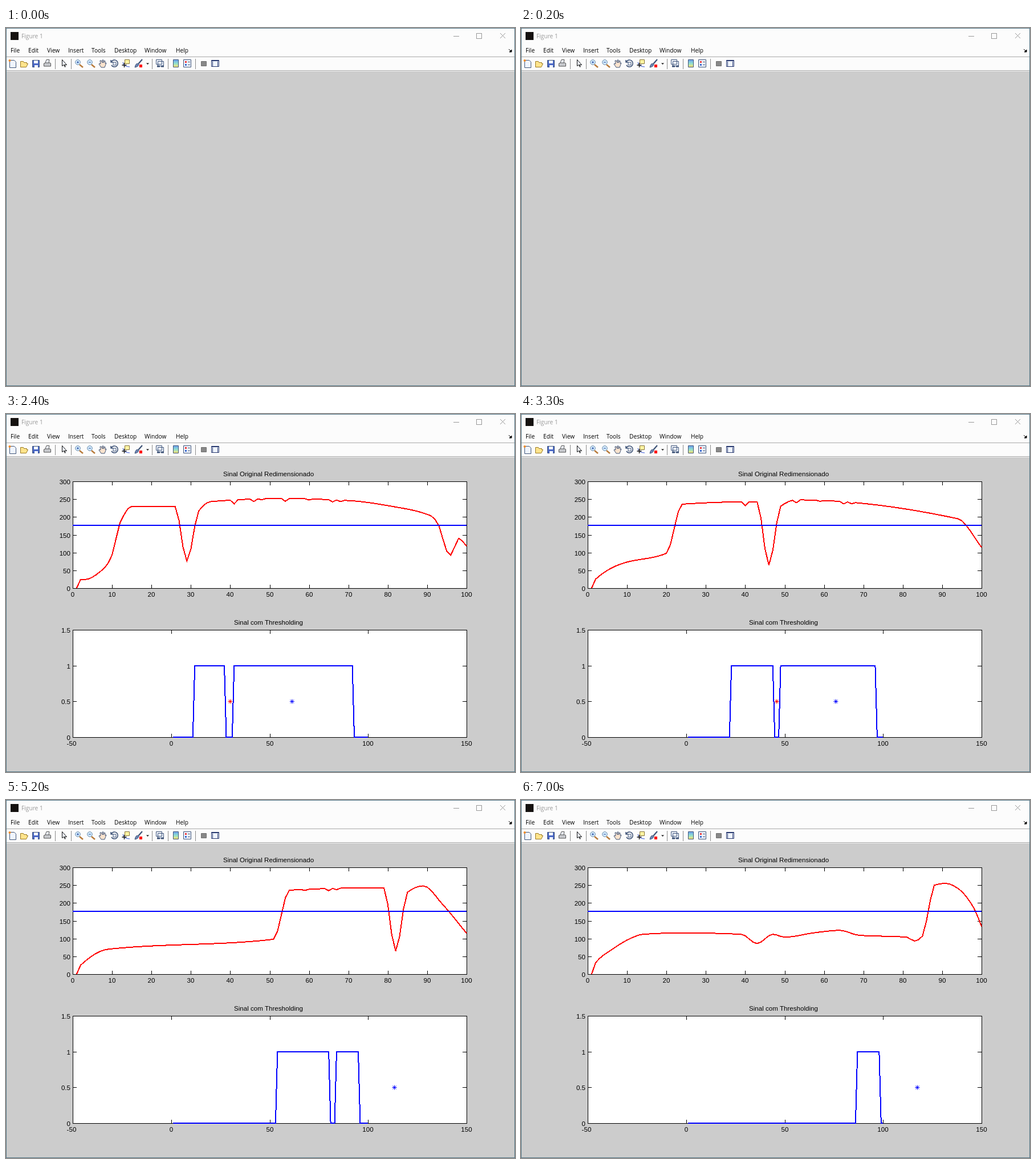
Recreate the animation shown at these times as an HTML page. Size 893 by 627 pixels, loop 8000 ms.

```html
<!DOCTYPE html>
<html lang="en">
<head>
<meta charset="utf-8">
<title>Figure 1</title>
<style>
  html, body { margin: 0; width: 100%; height: 100%; overflow: hidden; background: #ccc; }
  svg { display: block; }
  .ui { font: 10.2px "Open Sans", "Noto Sans", sans-serif; }
  .plot { font: 11.6px "Liberation Sans", Arial, sans-serif; }
  .crisp { shape-rendering: crispEdges; }
  .trace { fill: none; stroke-width: 2; }
</style>
</head>
<body>
<svg width="893" height="627">
  <rect width="893" height="627" fill="#ccc"/>
  <g class="crisp">
    <rect width="893" height="75" fill="#fcfcfc"/>
    <path d="M0 50.5H893M0 74.5H893" stroke="#a8a8a8"/>
    <path d="M0 75.5H893" stroke="#f4f4f4"/>
    <path id="separators" stroke="#8c8c8c"/>
    <rect x="8" y="7" width="14" height="14" fill="#15110f"/>
  </g>
  <g fill="none" stroke="#999">
    <path d="M785 14.5h10M867 9l9 9m0-9l-9 9"/>
    <rect x="825.5" y="9.5" width="9" height="9"/>
  </g>
  <path d="M882 37l4 4m1-3v4h-4z" stroke="#000"/>
  <g class="ui" id="menu"><text x="27" y="18" fill="#999">Figure 1</text></g>

  <!-- toolbar -->
  <g stroke="#3f5478" stroke-linejoin="round" fill="#f0f5ff">
    <path d="M6.5 56.5h8l3 3v10h-11z"/>
    <circle cx="6.5" cy="57" r="2" fill="#f08a24" stroke="none"/>
    <path d="M25.5 68.500v-10h5l1 2h5v2h2l-3 6z" fill="#ffe48c" stroke="#9b7a23"/>
    <path d="M46.500 56.500h12v12h-12z" fill="#4a67c4"/>
    <path d="M49 57h7v5h-7zM50 65h6v4h-6z" stroke="none"/>
    <path d="M69 61l2-5.500h5l-1 5.500" stroke="#555"/>
    <path d="M66.500 62l3-1h8l1 1v5h-12z" fill="#c7c9cd" stroke="#555"/>
    <path d="M98.500 55.500v11l3-2 2 4 1-1-2-3h4z" stroke="#111"/>
    <g id="lens">
      <path d="M129 64l6 5" stroke="#b77a3a" stroke-width="2.5"/>
      <circle cx="126" cy="60" r="4.3" fill="#d8f0ff" stroke="#6585a8"/>
      <path d="M124 60h4" stroke="#1c3f9c"/>
    </g>
    <use href="#lens" x="21"/>
    <path d="M126 58v4" stroke="#1c3f9c"/>
    <path d="M167 69l-4-6 1-1 2 1-1-6h2l2 4v-5h2v5l2-4 1 1v4l2-1-3 8z" fill="#fbe3cd"/>
    <path d="M185 59a6 6 0 1 1 0 6m-1-9v4h4" fill="none" stroke-width="1.6"/>
    <rect x="188" y="60" width="5" height="5"/>
    <rect x="208.5" y="55.5" width="8" height="7" fill="#fff4a3" stroke="#86753a"/>
    <path d="M205 60q1 8 12 8" fill="none" stroke="#3555d5"/>
    <path d="M207.5 61v8m-4-4h8" stroke="#111" stroke-width="1.4"/>
    <path d="M239 55l-7 8" stroke-width="2.2"/>
    <path d="M226 69q1-6 4-7l3 2q-1 4-7 5" fill="#6d86b5"/>
    <rect x="234" y="64" width="5" height="5" fill="#f00" stroke="none"/>
    <path d="M246 61.5h5l-2.500 2.500z" fill="#111" stroke="none"/>
    <path d="M263.5 55.5h10v8h-10zm3 3h10v8h-10z"/>
    <path d="M265 67h12" stroke-width="3" stroke-dasharray="5 2"/>
    <rect x="293.5" y="55.5" width="9" height="13" fill="url(#bar)"/>
    <rect x="311.5" y="55.5" width="13" height="13"/>
    <path d="M314 58h3v3h-3z" fill="#e33" stroke="none"/>
    <path d="M314 63h3v3h-3z" fill="#36c" stroke="none"/>
    <path d="M319 59.5h4m-4 5h4"/>
    <rect x="342.5" y="58.5" width="9" height="8" fill="#888" stroke="#707070"/>
    <path d="M360.5 56.5h13v11h-13zm0 1h13m-11 1v9m9-9v9" stroke="#28396f"/>
  </g>
  <linearGradient id="bar" x2="0" y2="1">
    <stop stop-color="#6b9cf0"/><stop offset=".5" stop-color="#8fe0d0"/><stop offset="1" stop-color="#ffe36b"/>
  </linearGradient>
  <rect class="crisp" x=".5" y=".5" width="892" height="626" fill="none" stroke="#567888"/>

  <g id="plots" class="plot" visibility="hidden">
    <g id="axes"></g>
    <g class="crisp trace">
      <polyline id="signal" stroke="#f00"/>
      <path d="M117 195h691" stroke="#00f"/>
      <polyline id="binary" stroke="#00f"/>
    </g>
    <path id="dipMark" d="M-4 0h8M0-4v8M-3-3l6 6m0-6l-6 6" stroke="#f00"/>
    <path id="laneMark" d="M-4 0h8M0-4v8M-3-3l6 6m0-6l-6 6" stroke="#00f"/>
  </g>
</svg>
<script>
const $ = id => document.getElementById(id);
const LOOP = 8000, THRESHOLD = 176.5;
const LEFT = 117, WIDTH = 691;

const signalX = x => LEFT + x * WIDTH / 100;
const signalY = y => 305 - y * 187 / 300;
const binaryX = x => LEFT + (x + 50) * WIDTH / 200;
const binaryY = y => 566 - y * 188 / 1.5;
const range = (from, to, step) =>
  Array.from({ length: (to - from) / step + 1 }, (_, i) => from + i * step);

// Monotone cubic through flat x, y knots.
function curve(knots, x) {
  const px = i => knots[2 * i], py = i => knots[2 * i + 1], last = knots.length / 2 - 1;
  const secant = i => (py(i + 1) - py(i)) / (px(i + 1) - px(i));
  const slope = i => {
    if (i === 0) return secant(0);
    if (i === last) return secant(i - 1);
    const a = secant(i - 1), b = secant(i);
    return a * b > 0 ? 2 * a * b / (a + b) : 0;
  };
  let i = 0;
  while (px(i + 1) < x) i++;
  const h = px(i + 1) - px(i), t = (x - px(i)) / h, u = 1 - t;
  return u * u * ((1 + 2 * t) * py(i) + t * h * slope(i)) +
    t * t * ((1 + 2 * u) * py(i + 1) - u * h * slope(i + 1));
}

// Small notches that recur in every bright stretch.
const notches = { 40: 11, 45: 7, 47: 3, 53: 8, 59: 3, 65: 6, 67: 4 };
const ripple = (x, y) => y > 225 ? notches[x] || 0 : 0;

const scans = [];
function addScan(at, dip, lane, shift, knots) {
  const values = range(1, 100, 1).map(x => {
    const y = curve(knots, x);
    return y - ripple(x - shift, y);
  });
  scans.push({ at, dip, lane, values });
}

// Dark ground, a bright stretch from start, and one narrow dip.
const roadKnots = (start, dip) => [
  1, 0, 2, 25, 9, 70, start - 2, 98, start + 2, 236, dip - 3, 243, dip, 65, dip + 3, 230,
  dip + 7, 248, Math.max(dip + 10, 94), 195, Math.max(dip + 14, 100), 115];

addScan(1400, 17.8, 52.4, 0, [
  1, 0, 3, 44, 6, 148, 11, 215, 14, 231, 16, 214, 18, 110, 20, 180, 22, 236, 36, 248,
  60, 255, 70, 248, 78, 232, 83, 214, 86, 88, 89, 204, 94, 181, 98, 54, 100, 37]);
addScan(2400, 30, 61.4, 1, [
  1, 0, 2, 24, 3, 24, 8, 56, 10, 93, 12, 183, 15, 230, 26, 230, 29, 76, 32, 217, 35, 243,
  53, 252, 70, 246, 82, 228, 91, 203, 93, 175, 95, 103, 96, 93, 98, 140, 100, 118]);
addScan(3300, 46, 76, 0, roadKnots(22, 46));
addScan(4200, undefined, 95.4, 0, [
  1, 0, 2, 25, 9, 70, 16, 90, 24, 94, 33, 99, 35, 187, 36, 230, 38, 243, 53, 252, 61, 237,
  62, 175, 64, 59, 67, 229, 69, 239, 73, 241, 80, 226, 92, 205, 94, 192, 95, 174, 100, 115]);
addScan(5200, undefined, 113.4, 0, roadKnots(53, 82));
addScan(6100, undefined, 102.4, 0, roadKnots(71, 97));
addScan(7000, undefined, 117.4, 0, [
  1, 0, 2, 32, 6, 68, 11, 101, 14, 112, 24, 116, 39, 112, 43, 86, 47, 112, 50, 104, 58, 117,
  64, 123, 69, 109, 81, 104, 83, 93, 85, 107, 87, 208, 88, 250, 91, 255, 94, 241, 98, 187, 100, 134]);

const label = (x, y, text, anchor = "middle") =>
  `<text x="${x}" y="${y}" text-anchor="${anchor}">${text}</text>`;

function axes(title, top, bottom, xs, ys, toX, toY) {
  const right = LEFT + WIDTH;
  let ticks = "", labels = label(460.5, top - 9, title);
  for (const x of xs) {
    const px = Math.round(toX(x)) + .5;
    ticks += `M${px} ${top}v7M${px} ${bottom}v-6`;
    labels += label(x < 0 ? 115 : px - .5, bottom + 15, x);
  }
  for (const y of ys) {
    const py = Math.round(toY(y)) + .5;
    ticks += `M${LEFT} ${py}h7M${right} ${py}h-7`;
    labels += label(113, py + 4, y, "end");
  }
  return `<g class="crisp" stroke="#000"><rect x="${LEFT + .5}" y="${top + .5}" width="${WIDTH}"
    height="${bottom - top}" fill="#fff"/><path d="${ticks}"/></g>${labels}`;
}

$("axes").innerHTML =
  axes("Sinal Original Redimensionado", 118, 305, range(0, 100, 10), range(0, 300, 50), signalX, signalY) +
  axes("Sinal com Thresholding", 378, 566, range(-50, 150, 50), range(0, 1.5, .5), binaryX, binaryY);

$("separators").setAttribute("d", [86, 114, 256, 284, 332].map(x => `M${x}.5 54v18`).join(""));

const menu = { File: 8, Edit: 39, View: 72, Insert: 109, Tools: 150, Desktop: 190, Window: 243, Help: 298 };
for (const [name, x] of Object.entries(menu)) $("menu").innerHTML += label(x, 43, name, "start");

const polyline = (id, values, toX, toY) =>
  $(id).setAttribute("points", values.map((y, i) => `${toX(i + 1)},${toY(y)}`).join(" "));

function mark(id, x) {
  $(id).style.display = x === undefined ? "none" : "";
  if (x !== undefined) $(id).setAttribute("transform", `translate(${binaryX(x)} 503.5)`);
}

let shown;
function draw(now) {
  const time = now % LOOP;
  const scan = scans.findLast(s => s.at <= time);
  if (scan !== shown) {
    shown = scan;
    $("plots").setAttribute("visibility", scan ? "visible" : "hidden");
    if (scan) {
      polyline("signal", scan.values, signalX, signalY);
      polyline("binary", scan.values.map(y => y > THRESHOLD ? 1 : 0), binaryX, binaryY);
      mark("dipMark", scan.dip);
      mark("laneMark", scan.lane);
    }
  }
  requestAnimationFrame(draw);
}
requestAnimationFrame(draw);
</script>
</body>
</html>
```
